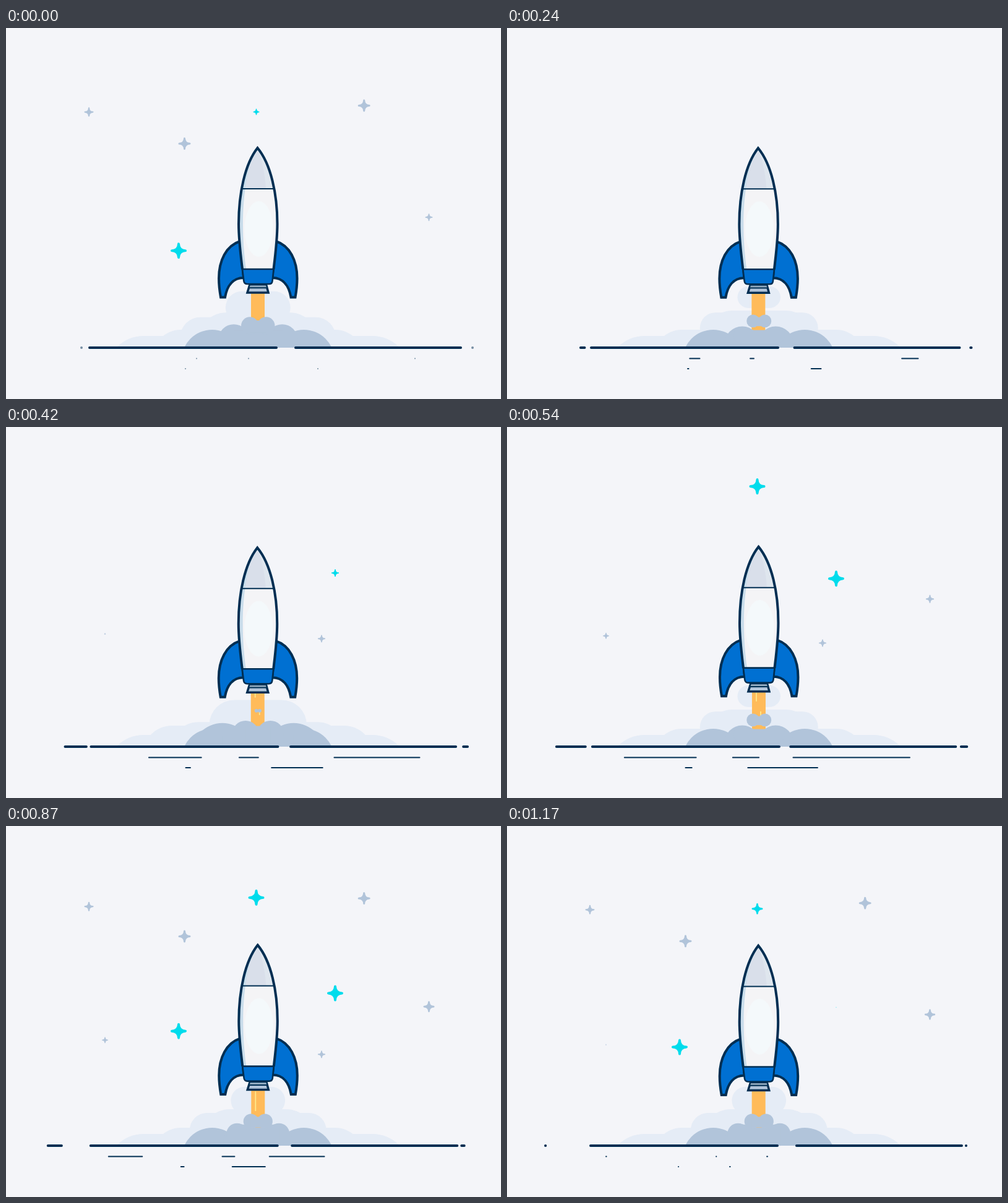
An HTML page with a canvas for the animation above (1200 ms loop, 800 by 600 pixels).

```html
<!DOCTYPE html>
<html lang="en">
<head>
<meta charset="utf-8">
<title>Rocket launch</title>
<style>
  html, body { margin: 0; width: 100%; height: 100%; overflow: hidden; background: #f4f5f9; }
  canvas { display: block; width: 800px; height: 600px; }
</style>
</head>
<body>
<canvas id="stage" width="800" height="600"></canvas>
<script>
const ctx = document.getElementById('stage').getContext('2d');
const LOOP = 1200, PUFF = 300, AXIS = 407.25, GROUND = 517;
const SKY = '#f4f5f9', NAVY = '#002e52', BLUE = '#0070d2', STEEL = '#b1c4da',
      MIST = '#e5ecf6', CYAN = '#00dcec', ORANGE = '#ffbb5a', YELLOW = '#ffe98c';

const clamp = v => Math.max(0, Math.min(1, v));
const cubicInOut = v => v < .5 ? 4 * v ** 3 : 1 - 4 * (1 - v) ** 3;
const smooth = v => v * v * (3 - 2 * v);
const wave = (t, cycles) => Math.sin(2 * Math.PI * cycles * t / LOOP);

function shape(d, fill, width = 0) {
  const path = new Path2D(d);
  if (fill) {
    ctx.fillStyle = fill;
    ctx.fill(path);
  }
  if (width) {
    ctx.strokeStyle = NAVY;
    ctx.lineWidth = width;
    ctx.lineCap = 'butt';
    ctx.lineJoin = 'miter';
    ctx.stroke(path);
  }
}

function line(x1, y1, x2, y2, width, color = NAVY) {
  ctx.strokeStyle = color;
  ctx.lineWidth = width;
  ctx.lineCap = 'round';
  ctx.beginPath();
  ctx.moveTo(x1, y1);
  ctx.lineTo(x2 + .01, y2);
  ctx.stroke();
}

// A star lives 800 ms: it pops up, sinks evenly and shrinks away
const starPath = new Path2D('M0-.85Q.03-.03 .85 0Q.03 .03 0 .85Q-.03 .03-.85 0Q-.03-.03 0-.85Z');

function drawStar(t, birth, x, y, speed, radius, color = STEEL) {
  const age = (t - birth + LOOP) % LOOP;
  const r = radius * clamp(Math.min(age, 800 - age) / 100);
  if (!r) return;
  ctx.save();
  ctx.translate(x, y + speed * age);
  ctx.scale(r, r);
  ctx.fillStyle = ctx.strokeStyle = color;
  ctx.lineWidth = .3;
  ctx.lineJoin = 'round';
  ctx.fill(starPath);
  ctx.stroke(starPath);
  ctx.restore();
}

function drawStars(t) {
  drawStar(t, 440, 404.5, 90, .06, 13, CYAN);
  drawStar(t, 560, 279, 305, .086, 13, CYAN);
  drawStar(t, 375, 532, 232.5, .0765, 13, CYAN);
  drawStar(t, 623, 134, 126, .017, 7.5);
  drawStar(t, 623, 578.7, 110.7, .0255, 10);
  drawStar(t, 555, 288.5, 170.5, .0255, 10);
  drawStar(t, 467, 683.5, 275, .0425, 9);
  drawStar(t, 392, 160, 334, .0255, 5);
  drawStar(t, 300, 510, 335, .06, 6);
}

// Dashes stretch to the left, then their right end catches up
function drawGround(t) {
  const sway = (1 - Math.cos(2 * Math.PI * t / LOOP)) / 2;
  const head = cubicInOut(clamp(t / 800)), tail = smooth(clamp((t - 400) / 800));
  const dash = (x, y, travel, width = 2, shift = 10) => {
    const from = x + shift * sway;
    line(from - travel * head, y, from - travel * tail, y, width);
  };
  line(135 + 3 * sway, GROUND, 437 + 3 * sway, GROUND, 4);
  line(468 - 10 * sway, GROUND, 735 - 10 * sway, GROUND, 4);
  ctx.globalAlpha = Math.min(1, .5 + t / 60);
  dash(122, GROUND, 60, 4);
  dash(754, GROUND, 12, 4, -10);
  dash(308, 534.5, 148);
  dash(392, 534.5, 54, 2, 20);
  dash(661, 534.5, 241);
  dash(290, 551, 13);
  dash(504, 551, 144);
  ctx.globalAlpha = 1;
}

// Puffs drift outward; each maps its progress k to [offset from the axis, top, radius]
const mistRise = k => {
  const e = Math.sin(k * Math.PI / 2);
  return [3 + 40 * e, 406 + 51 * k, 2 + 43 * e];
};
const mistSpread = k => [43 + 82 * smooth(k), 457 + 31 * smooth(k), 45];
const mistSettle = k => [70 + 115 * k, 460 + 38 * k, 25 + 35 * k];
const smokeRise = k => [27 * k, 453 + 29.5 * k, 29 * k];
const smokeSettle = k => [27 + 47 * k ** .85, 483 + 5 * k - 30 * k * (1 - k), 14 + 36 * smooth(clamp(1.8 * k))];

function capsule(dx, top, r) {
  ctx.beginPath();
  ctx.roundRect(AXIS - dx - r, top, 2 * (dx + r), 2 * r, r);
  ctx.fill();
}

function twins(dx, top, r) {
  for (const side of [-1, 1]) {
    ctx.beginPath();
    ctx.arc(AXIS + side * dx, top + r, r, 0, 7);
    ctx.fill();
  }
  ctx.fillRect(AXIS - dx, top + .4 * r, 2 * dx, 1.4 * r);
}

function stream(t, from, to, motion, draw) {
  for (let u = t % PUFF; u <= to; u += PUFF)
    if (u >= from) draw(...motion((u - from) / (to - from)));
}

function drawMist(t) {
  ctx.fillStyle = MIST;
  capsule(...mistSettle(1));
  capsule(...mistSpread(1));
  stream(t, 240, 540, mistSettle, capsule);
  stream(t, 540, 840, mistSpread, capsule);
  stream(t, 150, 540, mistRise, capsule);
}

function drawSmoke(t) {
  ctx.fillStyle = STEEL;
  twins(...smokeSettle(1));
  twins(...smokeRise(1));
  stream(t, 240, 540, smokeSettle, twins);
  stream(t, 75, 540, smokeRise, twins);
}

function aboveGround(draw, t) {
  ctx.save();
  ctx.beginPath();
  ctx.rect(0, 0, 800, GROUND);
  ctx.clip();
  draw(t);
  ctx.restore();
}

function drawFlame(t) {
  shape('M396 425H418V494H396Z', ORANGE);
  const streak = (x, from, to) => to > from && line(x, from, x, to, 1.8, YELLOW);
  const drop = 457 + (t - 330) * .017;
  if (t > 250 && t < 800) streak(410, drop, drop + 6.5);
  if (t < 1000) streak(403, 430 + 40 * clamp((t - 880) / 120), 443 + (t - 540) * .052);
}

const HULL = 'M382 390C379 365 376 342 376 317C376 268 386 220 406.5 194' +
             'C428 220 438.5 268 438.5 317C438.5 342 435.5 365 432.5 390';
const FIN = 'M378 345C356 352 344 376 344 405C344 417 345.5 427 347 435.5H354C357 418 366 404 384 404Z';

function drawRocket() {
  shape('M394 415H420.5L424 428H390Z', STEEL, 3.5);
  shape('M394.5 416.5H420L421 420H393.5Z', '#8fa9bf');
  line(393.5, 420.3, 421, 420.3, 2);

  shape(FIN, BLUE, 4);
  ctx.save();
  ctx.translate(2 * AXIS, 0);
  ctx.scale(-1, 1);
  shape(FIN, BLUE, 4);
  ctx.restore();

  ctx.save();
  ctx.clip(new Path2D(HULL + 'Z'));
  shape(HULL + 'Z', '#f4f4f6');
  shape('M434 260C437 310 434 350 429 390H440V260Z', '#eceff4');
  ctx.fillStyle = '#f4f9fb';
  ctx.beginPath();
  ctx.ellipse(408.5, 325, 23, 45, 0, 0, 7);
  ctx.fill();
  shape('M370 180H445V260H370Z', '#d9dfea');
  shape('M406.5 194C414 215 419 238 420 260H440V194Z', '#dfe6ee');
  shape('M406.5 190C390 220 383 270 383 317C383 345 385 368 388 390H370V190Z', '#c9ddeb');
  ctx.restore();

  line(382, 260, 432.5, 260, 2);
  shape('M382 390L384.3 409Q385 414 390 414H425Q430 414 430.5 409L432.5 390Z', BLUE, 2.6);
  shape(HULL, null, 4);
}

function render(t) {
  ctx.fillStyle = SKY;
  ctx.fillRect(0, 0, 800, 600);
  drawStars(t);
  aboveGround(drawMist, t);
  ctx.save();
  ctx.translate(.7 * wave(t, 3) - .6 * wave(t, .5) ** 2, 0);
  drawFlame(t);
  ctx.translate(0, wave(t, 1) + .7 * wave(t, 4));
  drawRocket();
  ctx.restore();
  aboveGround(drawSmoke, t);
  drawGround(t);
}

const start = performance.now();
function tick() {
  render((performance.now() - start) % LOOP);
  requestAnimationFrame(tick);
}
tick();
</script>
</body>
</html>
```
